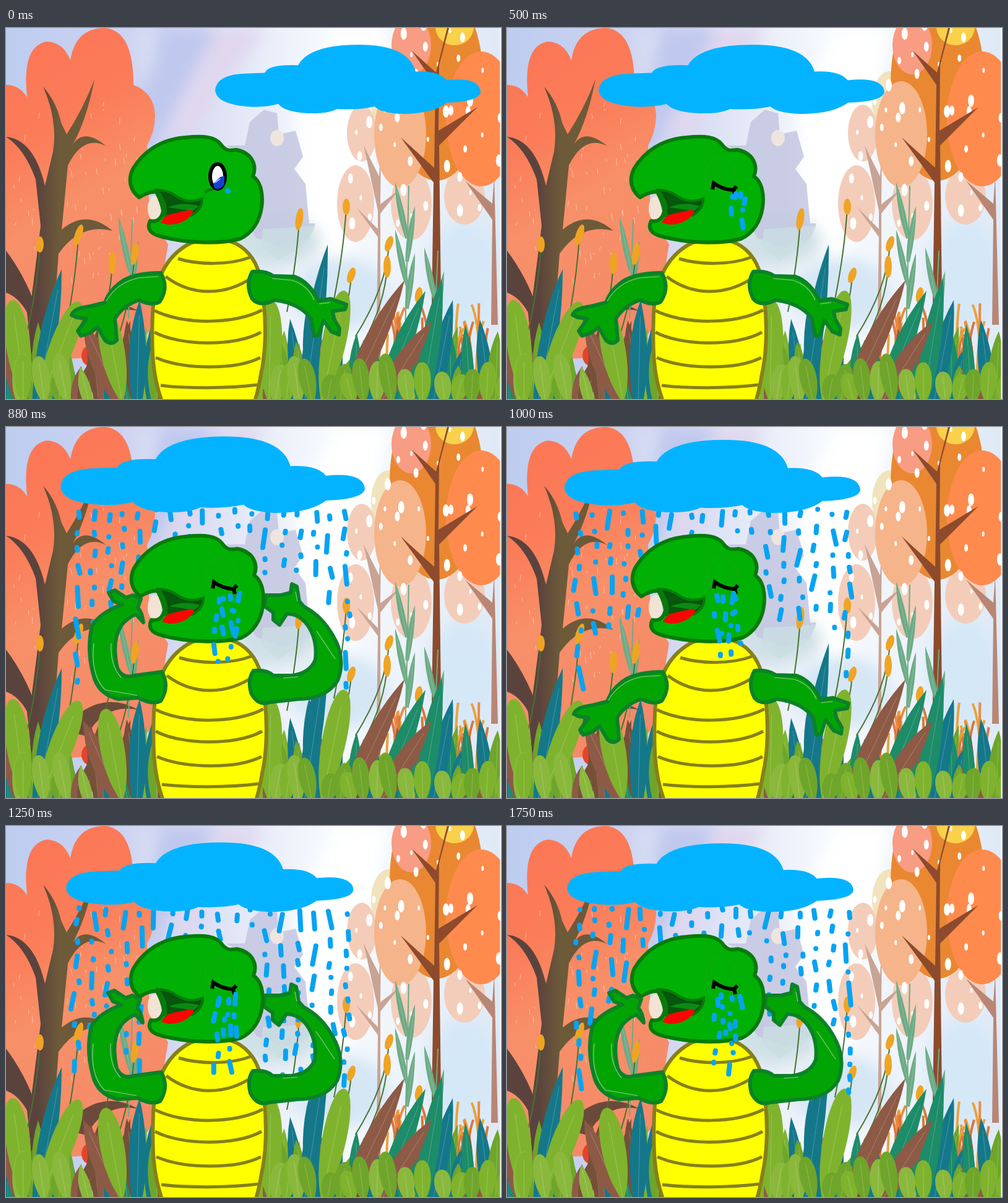
Animation of 800 by 600 pixels, one loop 1.87 s. Source, as an HTML page:

```html
<!DOCTYPE html>
<html lang="en">
<head>
<meta charset="utf-8">
<title>Crying turtle</title>
<style>
  html, body { margin: 0; width: 100%; height: 100%; overflow: hidden; background: #fff; }
  svg { display: block; width: 100vw; height: 100vh; }
  .water { fill: none; stroke: #06a3f2; stroke-width: 8; stroke-linecap: round; }
  .arm { fill: #02a404; stroke: #0b8226; stroke-width: 6; stroke-linejoin: round; }
  .glint { fill: none; stroke: #8fc98f; stroke-width: 1.2; }
</style>
</head>
<body>
<svg viewBox="0 0 800 600" preserveAspectRatio="none">
  <defs>
    <linearGradient id="sky">
      <stop offset="0" stop-color="#bccdf0"/><stop offset=".3" stop-color="#d0d3f1"/>
      <stop offset=".5" stop-color="#e6ebf8"/><stop offset=".66" stop-color="#f8fbfe"/>
      <stop offset="1" stop-color="#dfe9f6"/>
    </linearGradient>
    <linearGradient id="crown" x2=".3" y2="1">
      <stop offset="0" stop-color="#fc7556"/><stop offset=".35" stop-color="#fb7c58"/>
      <stop offset=".6" stop-color="#f79069"/><stop offset="1" stop-color="#f58a68"/>
    </linearGradient>
    <linearGradient id="bark">
      <stop offset=".3" stop-color="#5b433d"/><stop offset=".5" stop-color="#6d5a39"/>
    </linearGradient>
    <filter id="soft" x="-30%" y="-30%" width="160%" height="160%"><feGaussianBlur stdDeviation="12"/></filter>
  </defs>

  <rect width="800" height="600" fill="url(#sky)"/>
  <g filter="url(#soft)">
    <path d="M230 0H340L250 170L200 260Z" fill="#bfc8ee"/>
    <path d="M340 0H420L300 170H260Z" fill="#e0d7ee"/>
    <path d="M470 120L540 0H620L540 420L470 460Z" fill="#fff"/>
    <path d="M205 0H250L235 80L212 95Z" fill="#d5dcf3"/>
    <ellipse cx="440" cy="345" rx="70" ry="40" fill="#cfe0e6"/>
    <ellipse cx="540" cy="430" rx="80" ry="60" fill="#d5e6f5"/>
    <ellipse cx="740" cy="400" rx="60" ry="90" fill="#d5e8f8"/>
  </g>
  <path d="M386 190L394 152L417 132L438 138L441 172L468 166L480 208L466 228L484 252L490 316H500L490 340L450 356L405 340L380 300V205L356 190Z" fill="#c3c7e1" opacity=".85"/>
  <path d="M415 325L500 320L488 345L440 376L412 352Z" fill="#cbdfe3" opacity=".8"/>
  <ellipse cx="438" cy="178" rx="11" ry="13" fill="#eee5df"/>

  <g id="crowns">
    <ellipse cx="618" cy="120" rx="28" ry="50" fill="#f1e3bd"/>
    <g fill="#f3cdba">
      <ellipse cx="575" cy="170" rx="24" ry="46"/><ellipse cx="565" cy="284" rx="30" ry="62"/>
      <ellipse cx="655" cy="285" rx="33" ry="58"/><ellipse cx="741" cy="272" rx="33" ry="46"/>
    </g>
    <path d="M599 480L601 338L566 290L601 325V295L578 190L603 240L606 190L605 285L636 261L605 300V480Z" fill="#c9a394"/>
    <path d="M784 480L786 310L742 247L786 284L789 240L795 480Z" fill="#b98674"/>
    <ellipse cx="696" cy="90" rx="76" ry="157" fill="#e98831"/>
    <ellipse cx="655" cy="28" rx="32" ry="47" fill="#f89c83"/>
    <ellipse cx="725" cy="-2" rx="31" ry="30" fill="#fad14a"/>
    <ellipse cx="768" cy="147" rx="57" ry="109" fill="#ff8a4d"/>
    <ellipse cx="637" cy="172" rx="42" ry="86" fill="#f5b48a"/>
  </g>
  <g id="dots" fill="#fff"></g>
  <path d="M687 516L691 250L638 177L692 226L694 92L656 37L695 72L713 0H716L700 60L699 166L762 128L700 190L704 516Z" fill="#8d4a2d"/>

  <path d="M0 92Q22 92 34 112Q25 30 65 22Q92 22 104 52Q112 0 160 0Q206 4 206 92Q240 105 241 142Q240 170 228 190L232 300L262 350L240 480L200 530L0 540Z" fill="url(#crown)"/>
  <ellipse cx="240" cy="292" rx="11" ry="20" fill="#f3e3d4"/>
  <ellipse cx="134" cy="530" rx="12" ry="16" fill="#e4452a"/>
  <g id="flecks" stroke="#ffe1cf" stroke-linecap="round" opacity=".6"></g>
  <path d="M38 540L42 430L56 320L48 245Q30 195 0 176Q45 180 63 255L76 200Q84 150 60 95Q82 120 89 153L98 172Q125 130 143 83Q130 150 107 190Q125 160 162 191Q125 172 100 222L90 326Q130 292 172 328Q120 315 85 365L77 470L84 540Z" fill="url(#bark)"/>
  <path d="M0 360Q30 400 48 450L42 540L34 460Q20 435 0 428Z" fill="#5b433d"/>
  <path d="M90 490Q150 420 215 458Q160 445 130 500Z" fill="#6b4a3b"/>

  <g id="meadow"></g>
  <rect x="798.5" width="1.5" height="600" fill="#fff"/>

  <path id="rain" class="water"/>
  <path id="cloud" fill="#04b3ff" d="M1 75Q3 49 53 48L81 47Q88 33 135 35Q153 2 233 2Q313 2 325 45Q363 43 375 59Q428 53 430 78Q428 93 375 95Q353 113 303 113Q268 111 259 101Q233 107 198 105Q183 113 151 112Q113 110 103 97Q83 103 53 101Q3 97 1 75Z"/>

  <g id="turtle">
    <path d="M300 347Q330 340 362 345C385 352 403 372 410 400C422 460 421 520 412 560Q408 585 402 604L252 604C236 560 235 520 237 460C239 420 252 370 300 347Z" fill="#ff0" stroke="#85801b" stroke-width="6"/>
    <path d="M278 373C310 383 360 384 394 371M258 402C300 434 355 434 400 402M240 457C285 480 370 480 414 456M240 492C280 514 370 516 412 492M242 533C285 552 370 554 411 533M250 578C290 583 360 583 406 577" fill="none" stroke="#85801b" stroke-width="5"/>
    <g id="armsDown">
      <path class="arm" d="M250 396Q212 396 190 408Q168 422 160 444L136 450Q110 453 106 464L114 468L130 470L116 490L121 498L136 493L148 484L160 505Q170 514 179 505L176 470Q190 448 215 440Q236 450 248 443Q264 420 250 396Z"/>
      <path class="arm" d="M398 394Q420 392 432 401L466 402Q490 410 505 441L525 438L550 447L548 455L528 458L530 470L539 486L538 496L526 491L513 473L506 496L498 498L493 470Q475 445 434 440Q410 452 398 438Q386 415 398 394Z"/>
      <path class="glint" d="M162 442Q178 412 215 404L246 402M430 405L462 408Q488 416 498 440M506 446L524 444"/>
    </g>
    <g id="armsUp">
      <path class="arm" d="M250 396L205 402Q186 408 178 390Q168 345 185 320Q195 308 208 303L220 316Q218 300 211 292L216 278L203 272L192 276L174 264L164 268L172 282L186 287Q150 300 137 322Q128 360 139 400Q146 432 180 440L212 438Q235 450 248 443Q263 420 250 396Z"/>
      <path class="arm" d="M398 394Q420 392 430 402L460 402Q490 398 498 376Q502 340 482 316Q470 302 452 302L440 320L430 312V300L416 290L418 272L442 272L458 268L460 254L468 258L472 282L480 291Q513 308 532 348Q546 380 534 410Q515 440 470 440L425 445Q405 452 394 430Q388 408 398 394Z"/>
      <path class="glint" d="M140 350Q134 400 158 425L210 434M168 350Q166 385 184 405M446 406L470 404M466 266L469 282M500 330L530 375"/>
    </g>
    <path d="M215 274C200 262 197 245 205 228C222 200 250 180 290 177C320 174 338 176 347 188C354 198 360 199 372 197C398 202 406 222 399 240C412 248 416 270 413 290C410 312 398 332 378 341C345 350 290 348 250 337C230 332 228 322 233 312Q250 315 254 296Q252 282 243 265Q230 264 215 274Z" fill="#00b004" stroke="#087a0b" stroke-width="6" stroke-linejoin="round"/>
    <path d="M244 262Q262 262 275 272Q295 285 317 276Q318 292 300 303L256 304Q262 284 244 262Z" fill="#06560c" stroke="#087a0b" stroke-width="4"/>
    <path d="M262 290Q285 280 312 288L302 296Z" fill="#0a8a12"/>
    <path d="M250 315Q255 303 270 300L298 294Q306 296 298 304Q285 318 262 318Z" fill="#fb0505"/>
    <g id="openEye">
      <ellipse cx="342" cy="240" rx="12" ry="20" fill="#fff" stroke="#000" stroke-width="6"/>
      <path d="M335 252L346 241L353 239V252Q346 264 337 259Z" fill="#1440d4"/>
      <path d="M338 250L346 244" stroke="#9ab4ff" stroke-width="2"/>
      <path d="M322 266Q328 260 334 262" fill="none" stroke="#087a0b" stroke-width="4"/>
    </g>
    <g id="closedEye" fill="none">
      <circle cx="345" cy="236" r="24" stroke="#3f9a3f" stroke-dasharray="3 3"/>
      <path d="M332 261L334 251Q348 261 366 262L371 256M366 262L368 270" stroke="#000" stroke-width="6"/>
    </g>
    <path id="tears" class="water"/>
  </g>
</svg>
<script>
const $ = id => document.getElementById(id);
const pick = (list, r) => list[Math.floor(r * list.length)];
const repeat = (n, make) => Array.from({ length: n }, (_, i) => make(i)).join('');

function seeded(s) {
  return () => {
    s = (s + 0x6D2B79F5) | 0;
    let n = Math.imul(s ^ (s >>> 15), 1 | s);
    n = (n + Math.imul(n ^ (n >>> 7), 61 | n)) ^ n;
    return ((n ^ (n >>> 14)) >>> 0) / 4294967296;
  };
}

const ellipse = (x, y, rx, ry, extra = '') => `<ellipse cx="${x}" cy="${y}" rx="${rx}" ry="${ry}" ${extra}/>`;
const line = (d, color, w) => `<path d="${d}" fill="none" stroke="${color}" stroke-width="${w}"/>`;

function leaf(x, y, tipX, tipY, w, color, round) {
  const h = Math.hypot(tipX - x, tipY - y);
  const turn = Math.atan2(tipX - x, y - tipY) * 180 / Math.PI;
  const d = round
    ? `M0 0C${-w * .7} ${-.3 * h} ${-w * .6} ${-h} 0 ${-h}C${w * .6} ${-h} ${w * .7} ${-.3 * h} 0 0`
    : `M${-w * .3} 0Q${-w} ${-.55 * h} 0 ${-h}Q${w * .8} ${-.5 * h} ${w * .3} 0Z`;
  return `<g transform="translate(${x} ${y})rotate(${turn})"><path d="${d}" fill="${color}"/>` +
    line(`M0 0V${-h * .85}`, '#ffffff38', 1) + '</g>';
}

// White spots spiral outwards inside each crown
function crownDots() {
  return [...document.querySelectorAll('#crowns ellipse')].map(el => {
    const [cx, cy, rx, ry] = ['cx', 'cy', 'rx', 'ry'].map(name => +el.getAttribute(name));
    const count = Math.round(rx / 8);
    return repeat(count, i => {
      const far = .9 * Math.sqrt((i + .5) / count), a = i * 2.4 + cx, r = 2 + (i * 7 % 4);
      return ellipse(cx + rx * far * Math.cos(a), cy + ry * far * Math.sin(a), r, r * 2);
    });
  }).join('');
}

function sprig(x, top, foot) {
  return line(`M${x + 6} ${top + 20}L${x} ${foot}`, '#6cab85', 2) + repeat(4, i => {
    const y = top + 105 + i * 38, side = i % 2 ? 1 : -1;
    return y > foot ? '' : leaf(x + 3, y, x + side * 16, y - 90, 9, '#6cab85');
  });
}

function ear([x, y], i) {
  const size = 13 + i * 5 % 10, foot = x - 20 - (y > 340 ? x / 18 : 0);
  return line(`M${x} ${y}Q${x - 4} ${y + 70} ${foot} ${y + 150}`, '#47722f', 2) +
    ellipse(x, y, 6, size, `transform="rotate(${i % 3 * 9} ${x} ${y})" fill="#efa423"`);
}

function meadow() {
  const rand = seeded(7);
  const green = ['#7fb32d', '#8ab83c', '#6fa52a'], teal = ['#14788a', '#1d8c68'], brown = ['#8d5a46', '#765039'];
  const big = (color, w, round, list) => list.map(([foot, x, y]) => leaf(foot, 606, x, y, w, color, round)).join('');
  const strands = repeat(40, i => {
    const x = 600 + rand() * 200, y = 445 + rand() * 55;
    return line(`M${x} 560Q${x} ${y + 30} ${x + rand() * 40 - 20} ${y}`, pick(['#f18a3a', '#e9a23b', '#d9773f'], rand()), 4);
  });
  const undergrowth = repeat(105, i => {
    const x = i * 7.8 - 5, kind = pick([green, teal, brown], rand());
    return leaf(x, 612, x + rand() * 56 - 20, 470 + rand() * 85, 15 + rand() * 10, pick(kind, rand()));
  });
  const ears = [[550, 289], [474, 309], [619, 349], [616, 386], [667, 432], [117, 335], [55, 350], [208, 365], [558, 400], [172, 380]];
  const front = repeat(22, i => {
    const x = (i < 5 ? 0 : 300) + i * 23 + rand() * 20;
    return leaf(x, 608, x + rand() * 30 - 15, 525 + rand() * 40, 28, pick(green, rand()), true);
  });
  return sprig(645, 235, 500) + sprig(198, 290, 470) + sprig(692, 340, 500) + ears.map(ear).join('') + strands + undergrowth +
    big(teal[0], 26, false, [[50, 90, 390], [212, 216, 440], [500, 490, 438], [482, 520, 350], [690, 722, 440]]) +
    big(teal[1], 28, false, [[605, 678, 425], [672, 705, 405]]) +
    big(brown[0], 30, false, [[25, 4, 490], [185, 125, 475], [605, 688, 475], [550, 644, 408]]) +
    big(green[0], 40, true, [[32, 10, 440], [55, 118, 443], [188, 160, 456], [425, 428, 440], [510, 547, 425]]) + front;
}

// One wobbling column of falling strokes
function drops(x, top, end, longest, gap, rand) {
  let d = '', y = top + rand() * 12;
  while (y < end) {
    const long = rand() * rand() * longest;
    d += `M${x + rand() * 10 - 5} ${y}l${(rand() - .5) * long * .5} ${long + .1}`;
    y += long + gap + rand() * 12;
  }
  return d;
}

function rainPath(k) {
  if (k < 6) return '';
  const rand = seeded(k * 31);
  const end = 210 + 200 * Math.sin(Math.PI * (k - 5.5) / 10.2) ** 1.5;
  return repeat(18, i => {
    const x = 115 + i * 25.6, side = Math.abs(i - 8.5) / 8.5;
    const behindHead = x > 225 && x < 412;
    const low = behindHead ? 178 : end - rand() * 40 + (430 - end) * side ** 8;
    return drops(x, 132, low, 38, 16, rand);
  });
}

function tearPath(k) {
  if (k < 4) return repeat(Math.floor(1 + 1.5 * k), i => `M${358 + i * 3.5} ${263 + i * 10.5}l1 1`);
  const rand = seeded(k * 17);
  const [left, gap] = k < 6 ? [360, 8] : [338, 11];
  const end = Math.min(385, 318 + (k - 4) * 22);
  return repeat(4, i => drops(left + i * gap, 268, end - 35 * (i % 2), 22, 12, rand));
}

// step, left, top, width
const cloudKeys = [[0, 337, 25, 430], [2, 278, 23, 430], [4, 147, 25, 463], [5, 87, 21, 478],
  [7, 87, 13, 493], [9, 96, 24, 466], [14, 96, 26, 464]];

function cloudAt(k) {
  const next = Math.max(1, cloudKeys.findIndex(key => key[0] >= k));
  const a = cloudKeys[next - 1], b = cloudKeys[next];
  return a.map((v, i) => v + (b[i] - v) * (k - a[0]) / (b[0] - a[0])).slice(1);
}

const show = (id, on) => $(id).setAttribute('display', on ? 'inline' : 'none');

function draw(k) {
  const [x, y, w] = cloudAt(k);
  $('cloud').setAttribute('transform', `translate(${x} ${y})scale(${w / 430} ${(139 - y) / 113})`);
  $('turtle').setAttribute('transform', `translate(${k < 6 ? '0 0' : k < 10 ? '2 0' : '1 2'})`);
  show('armsDown', k % 4 < 2);
  show('armsUp', k % 4 > 1);
  show('openEye', k < 4);
  show('closedEye', k > 3);
  $('rain').setAttribute('d', rainPath(k));
  $('tears').setAttribute('d', tearPath(k));
}

// Steps last 125 ms, rounded to hundredths of a second
let shown = -1;
function tick() {
  const k = Math.floor(Math.floor(performance.now() % 1870 / 10) / 12.5);
  if (k !== shown) draw(shown = k);
  requestAnimationFrame(tick);
}

const rand = seeded(3);
$('dots').innerHTML = crownDots();
$('flecks').innerHTML = repeat(70, () =>
  `<path d="M${10 + rand() * 205} ${120 + rand() * 290}l${rand() * 4 - 2} ${2 + rand() * 9}"/>`);
$('meadow').innerHTML = meadow();
tick();
</script>
</body>
</html>
```
